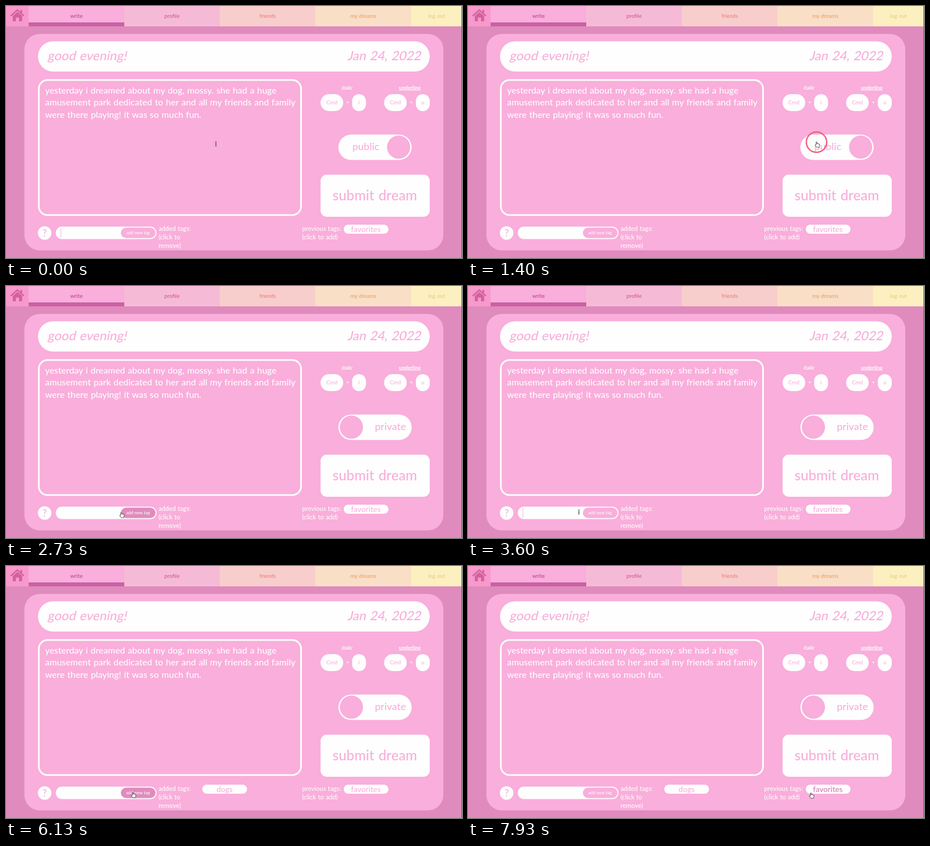
Animation, 806 px wide and 446 px high, one loop 8 s. Source, as an HTML page:

```html
<!DOCTYPE html>
<html lang="en">
<head>
<meta charset="utf-8">
<title>Dream journal</title>
<style>
  html, body { margin: 0; width: 100%; height: 100%; overflow: hidden; background: #e08bbd; }
  svg { display: block; width: 806px; height: 446px; }
  text { font-family: Lato, "Open Sans", sans-serif; font-weight: 500; word-spacing: .05em; white-space: pre; }
  .mid { text-anchor: middle; }
  .tab { font-size: 9.6px; }
  .title { font-size: 22.5px; }
  .entry { font-size: 15.8px; }
  .hint { font-size: 9.1px; font-weight: 700; }
  .key { font-size: 9.5px; }
  .note { font-size: 11.2px; }
  .tag { font-size: 13.6px; }
  .toggle { font-size: 18px; }
  .white { fill: #fefefe; }
  .pink { fill: #f9aedb; }
</style>
</head>
<body>
<svg viewBox="0 0 806 446">
  <rect width="806" height="446" fill="#e08bbd"/>

  <g id="tabs"></g>
  <rect x="40" y="29" width="169" height="7" fill="#ca61a5"/>
  <g fill="#d4619f">
    <path d="M12 17.5L20 10.5L28.500 17.500V27H23V20.500H17.500V27H12Z"/>
    <path d="M25.500 7H28.500V12H25.500Z"/>
    <path d="M9 17L20 7.200L31 17" fill="none" stroke="#d4619f" stroke-width="2.400" stroke-linecap="round"/>
  </g>

  <rect class="pink" x="32.500" y="49.500" width="740.500" height="383" rx="27"/>
  <rect class="white" x="56.500" y="62.500" width="692.500" height="53.500" rx="26.700"/>
  <text class="title pink" transform="translate(73 96) skewX(-12)">good evening!</text>
  <text class="title pink" transform="translate(733 96) skewX(-12)" text-anchor="end">Jan 24, 2022</text>

  <rect x="58" y="131" width="463.500" height="239" rx="15.500" fill="none" stroke="#fefefe" stroke-width="3"/>
  <g class="entry white">
    <text x="69" y="155">yesterday i dreamed about my dog, mossy. she had a huge</text>
    <text x="69" y="176.300">amusement park dedicated to her and all my friends and family</text>
    <text x="69" y="197.600">were there playing! it was so much fun.</text>
  </g>

  <text class="hint white mid" transform="translate(602.500 147.500) skewX(-12)">italic</text>
  <text class="hint white mid" x="713.700" y="147.500" text-decoration="underline">underline</text>
  <g id="keys"></g>

  <rect class="white" x="587.500" y="227.500" width="129.500" height="45" rx="22.500"/>
  <circle id="knob" class="pink" cy="249.800" r="20.500"/>
  <text id="visibility" class="toggle pink mid" y="255"></text>

  <rect class="white" x="556" y="298.500" width="193" height="74.500" rx="11"/>
  <text class="pink mid" x="652" y="344" font-size="24.700">submit dream</text>

  <circle class="white" cx="68.300" cy="401.700" r="12"/>
  <text class="pink mid" x="68.300" y="408" font-size="18">?</text>
  <rect class="white" x="88" y="390.500" width="178" height="22" rx="11"/>
  <text id="typed" class="tag pink" x="96.500" y="406"></text>
  <path id="caret" d="M0 393V410" stroke="#e3a4cb" stroke-width=".8"/>
  <rect id="addButton" x="203" y="392.200" width="61.300" height="18.600" rx="9.300"/>
  <text class="white mid" x="233.300" y="403.800" font-size="7.700">add new tag</text>

  <g class="note white">
    <text x="269.700" y="397.600">added tags:</text>
    <text x="269.700" y="412.600">(click to</text>
    <text x="269.700" y="427.600">remove)</text>
    <text x="523.500" y="397.600">previous tags:</text>
    <text x="523.500" y="412.600">(click to add)</text>
  </g>
  <g id="dogs">
    <rect class="white" x="347" y="387" width="79" height="16" rx="8"/>
    <text id="dogsLabel" class="tag mid" x="386.300" y="400.300">dogs</text>
  </g>
  <rect class="white" x="597" y="387" width="79" height="16" rx="8"/>
  <text id="favLabel" class="tag mid" x="636" y="400.300">favorites</text>

  <rect x="805" width="1" height="446" fill="#80566f"/>

  <g id="pointer">
    <circle id="ring" fill="none" stroke="#ee5f79" stroke-width="2.400"/>
    <path id="arrow" d="M0 0V7L1.700 5.500L2.800 8L3.900 7.500L2.800 5.100H5Z" fill="#222" stroke="#fff" stroke-width=".5"/>
    <path id="hand" d="M-.8 0Q0-1.400 .8 0V3Q2-.1 2.800 3.200Q4 2.200 4.400 3.700Q5.800 3 5.600 5L4.600 9H.1L-2.700 5.300Q-2.500 3.800-.8 5.200Z" fill="#fff" stroke="#333" stroke-width=".8"/>
    <path id="beam" d="M-1.600-4.300Q0-4 0-3V3Q0 4-1.600 4.300M1.600-4.300Q0-4 0-3V3Q0 4 1.600 4.300M-1 .8H1" fill="none" stroke="#555" stroke-width=".8"/>
  </g>
</svg>

<script>
const LOOP = 8000;
const PINK = "#f9aedb", DARK_PINK = "#e08bbd", HOVER_TEXT = "#d977b2";
const $ = id => document.getElementById(id);
const clamp = v => Math.max(0, Math.min(1, v));
const ease = v => v * v * (3 - 2 * v);
const show = (id, visible) => $(id).setAttribute("display", visible ? "inline" : "none");
const set = (id, attrs) => {
  for (const name in attrs) $(id).setAttribute(name, attrs[name]);
};

// label, left, width, background, text colour
const tabs = [
  ["", 0, 40, "#f799cb", ""],
  ["write", 40, 169, "#f9aedb", "#bd438f"],
  ["profile", 209, 169, "#f5bbd6", "#d9549d"],
  ["friends", 378, 169, "#f8cecc", "#ed7f83"],
  ["my dreams", 547, 169, "#fadfc7", "#e6a263"],
  ["log out", 716, 90, "#fdf0c0", "#e5ce78"]
];
$("tabs").innerHTML = tabs.map(([label, x, w, back, ink]) =>
  `<rect x="${x}" width="${w}" height="36" fill="${back}"/>
   <text class="tab mid" x="${x + w / 2}" y="20.700" fill="${ink}">${label}</text>`).join("");

const key = (label, x, w) =>
  `<rect class="white" x="${x}" y="156" width="${w}" height="30" rx="${Math.min(15, w / 2)}"/>
   <text class="key pink mid" x="${x + w / 2}" y="174">${label}</text>`;
const plus = x => `<text class="key white mid" x="${x}" y="174">+</text>`;
$("keys").innerHTML = key("Cmd", 556, 40) + plus(604) + key("i", 611.7, 24.6) +
  key("Cmd", 668.3, 40) + plus(716.5) + key("u", 724.4, 24.6);

// time, x, y of the pointer's hot spot
const path = [
  [0, 371, 244], [500, 371, 244], [1200, 616, 241], [1700, 616, 241],
  [2450, 230, 402], [2730, 203.5, 401], [3000, 196, 400], [4900, 196, 400],
  [5400, 224, 401], [6200, 224, 401], [6700, 375, 396], [6850, 386, 396],
  [7000, 448, 395], [7600, 600, 402], [7900, 606, 402], [LOOP, 606, 402]
];
const TOGGLE_CLICK = 1300, INPUT_CLICK = 3050, ADD_CLICK = 5600;
const clicks = [TOGGLE_CLICK, INPUT_CLICK, ADD_CLICK];
const HOVER_LAG = 120;

function pointerAt(t) {
  const i = Math.max(1, path.findIndex(p => p[0] >= t));
  const [t0, x0, y0] = path[i - 1], [t1, x1, y1] = path[i];
  const k = ease(clamp((t - t0) / (t1 - t0)));
  return [x0 + (x1 - x0) * k, y0 + (y1 - y0) * k];
}

const inside = ([x, y], left, top, right, bottom) =>
  x >= left && x <= right && y >= top && y <= bottom;
const onToggle = p => inside(p, 587, 227, 717, 273);
const onSubmit = p => inside(p, 556, 298, 749, 373);
const onAdd = p => inside(p, 203, 392, 265, 411);
const onDogs = p => inside(p, 347, 387, 426, 403);
const onFavorites = p => inside(p, 597, 387, 676, 403);
const onText = p => inside(p, 57, 130, 523, 371) || inside(p, 88, 390, 203, 412);

function render(t) {
  const slide = ease(clamp((t - 1420) / 380));
  set("knob", { cx: 694 - 83.5 * slide });
  $("visibility").textContent = slide < .5 ? "public" : "private";
  set("visibility", { x: slide < .5 ? 636 : 679.5 });

  const added = t >= ADD_CLICK + 100;
  const letters = added ? 0 : Math.max(0, Math.min(4, Math.floor((t - 3600) / 220)));
  $("typed").textContent = "dogs".slice(0, letters);
  const typing = t > 3600 && t < 5000;
  const focused = t < TOGGLE_CLICK || (t > INPUT_CLICK && t < ADD_CLICK);
  show("caret", focused && (typing || t % 1000 < 500));
  const end = letters ? $("typed").getComputedTextLength() : 0;
  set("caret", { transform: `translate(${97 + end} 0)` });
  show("dogs", added);

  const hover = pointerAt(Math.max(0, t - HOVER_LAG));
  set("addButton", { fill: onAdd(hover) ? DARK_PINK : PINK });
  set("dogsLabel", { fill: onDogs(hover) ? HOVER_TEXT : PINK });
  set("favLabel", { fill: onFavorites(hover) ? HOVER_TEXT : PINK });

  const point = pointerAt(t);
  const hand = onToggle(point) || onSubmit(point) || onAdd(point) ||
    (added && onDogs(point)) || onFavorites(point);
  const beam = !hand && onText(point);
  set("pointer", { transform: `translate(${point})` });
  show("hand", hand);
  show("beam", beam);
  show("arrow", !hand && !beam);

  const click = clicks.find(c => t >= c && t < c + 350);
  show("ring", click !== undefined);
  if (click !== undefined) {
    const age = t - click;
    set("ring", { r: 12 + 6 * clamp(age / 90), opacity: 1 - clamp((age - 150) / 200) });
  }
}

function frame() {
  render(performance.now() % LOOP);
  requestAnimationFrame(frame);
}
frame();
</script>
</body>
</html>
```
